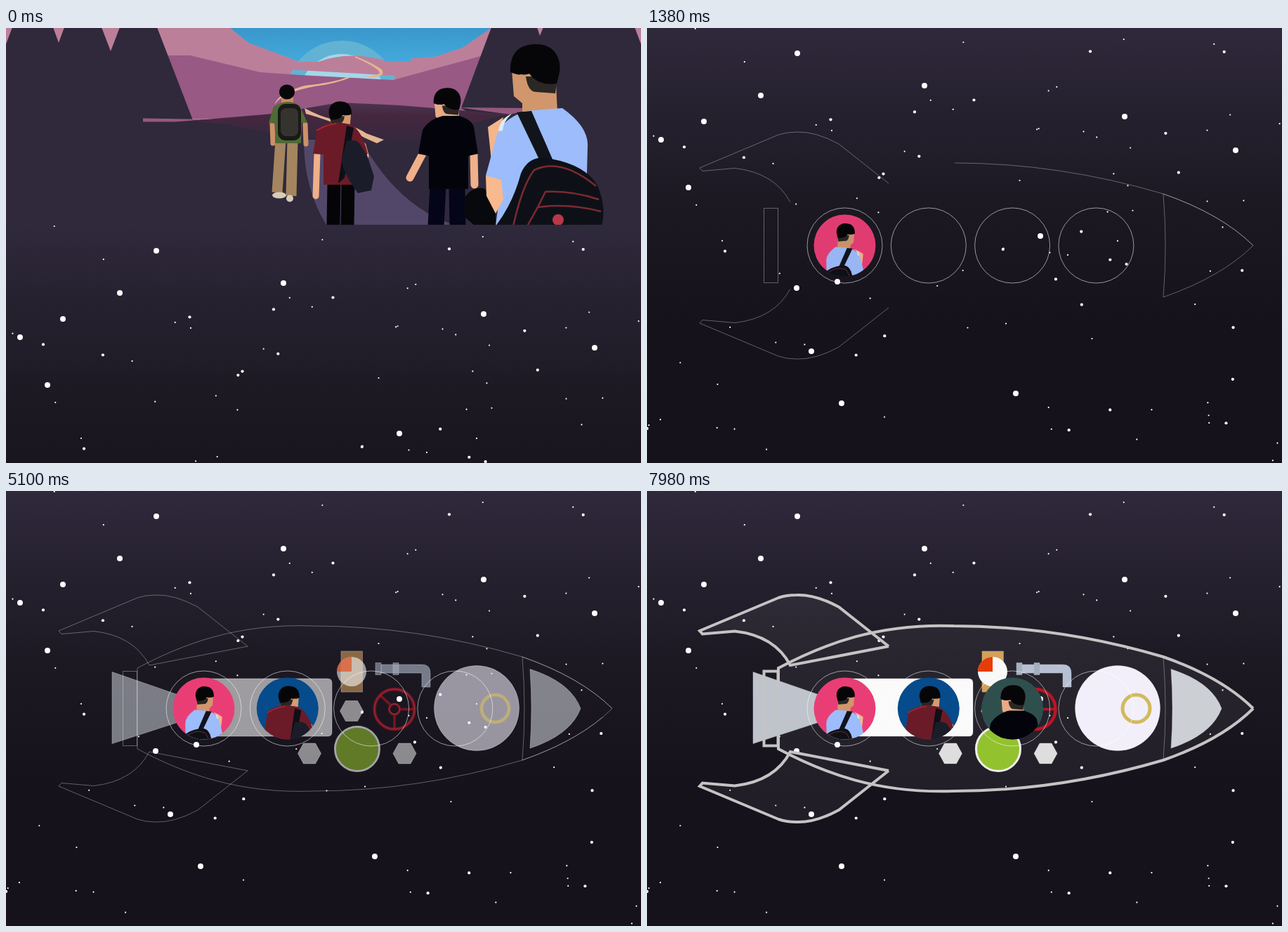
An HTML page for the animation above (8000 ms loop, 904 by 619 pixels).

```html
<!DOCTYPE html>
<html lang="en">
<head>
<meta charset="utf-8">
<title>Rocket journey</title>
<style>
html, body { margin: 0; width: 100%; height: 100%; overflow: hidden; background: #15121b; }
svg { display: block; width: 904px; height: 619px; }
.thin { fill: none; stroke: #fff; stroke-opacity: .32; }
.ring { fill: none; stroke: #fff; stroke-opacity: .55; }
.thick { fill: none; stroke: #c4c4c4; stroke-width: 4; }
#machinery > * { opacity: var(--shown); }
</style>
</head>
<body>
<svg id="stage" viewBox="0 0 904 619"></svg>
<script>
const LOOP = 8000, SCROLL = 282, MIDDLE = 309.5;

// ---- drawing helpers ----
const path = (fill, d, more = '') => `<path fill="${fill}" d="${d}" ${more}/>`;
const disc = (fill, x, y, r, ry = r) => `<ellipse fill="${fill}" cx="${x}" cy="${y}" rx="${r}" ry="${ry}"/>`;
const box = (fill, x, y, w, h, r = 0) => `<rect fill="${fill}" x="${x}" y="${y}" width="${w}" height="${h}" rx="${r}"/>`;
const line = (color, width, d) => path('none', d, `stroke="${color}" stroke-width="${width}"`);
const limb = (color, width, d) => path('none', d, `stroke="${color}" stroke-width="${width}" stroke-linecap="round"`);
const place = (matrix, art) => `<g transform="matrix(${matrix})">${art}</g>`;
const mirror = art => place([1, 0, 0, -1, 0, 2 * MIDDLE], art);
const circle = (x, y, r) => `M${x + r} ${y}a${r} ${r} 0 1 1 ${-2 * r} 0a${r} ${r} 0 1 1 ${2 * r} 0z`;
const rect = (x, y, w, h) => `M${x} ${y}h${w}v${h}h${-w}z`;
const hex = (x, y) => `M${x - 16.5} ${y}l8 -14.5h17l8 14.5l-8 14.5h-17z`;
const gradient = (id, stops) => `<linearGradient id="${id}" x2="0" y2="1">${stops.map(([o, c]) =>
  `<stop offset="${o}" stop-color="${c}"/>`).join('')}</linearGradient>`;

// a head seen half from behind; dir 1 looks left, -1 right
const head = (x, y, size, dir, skin) => place([size * dir, 0, 0, size, x, y],
  path(skin, 'M-33 0L-30 38L-18 48V60H32L30 20L0 0z') +
  path('#2a2724', 'M-13 10Q-10 32 2 32L29 34L32 10z') +
  path('#060608', 'M-35 4C-36 -28 -18 -36 2 -36C28 -36 40 -14 34 8L31 20Q5 24 -8 6Q-20 10 -35 4z') +
  path(skin, 'M-23 8q9 -4 9 8t-8 10z'));

// ---- walkers ----
const green =
  limb('#cf9068', 7, 'M379 137L380 165M426 138L427 166') +
  line('#a4855f', 15, 'M391 160L386 235M408 160L406 240') +
  disc('#d8cbb8', 389, 239, 10, 4.5) + disc('#d8cbb8', 404, 243.5, 5) +
  box('#c98b63', 392, 95, 17, 15, 4) + disc('#08080a', 400, 92, 11, 10.5) +
  path('#4e6b35', 'M374 136L381 113Q400 100 418 111L429 136H421L420 165H383V137z') +
  box('#1a1917', 387, 109, 33, 52, 11) + box('#35332d', 391, 115, 25, 40, 8);

const red =
  limb('#f0b088', 9, 'M443 180L441 240M508 168L512 183') +
  line('#050507', 19, 'M467 222L466 283M487 222L486 283') +
  head(476, 122, .46, -1, '#d99a70') +
  path('#6b1b27', 'M437 180L443 145Q450 138 472 135L490 138Q507 146 515 180L500 190L497 224H452V181z') +
  line('#b02a35', 1.5, 'M442 147Q455 139 470 137') +
  path('#0e0f16', 'M485 140L495 143L482 214L473 222z') +
  path('#1a1d29', 'M485 162Q500 158 505 168L514 182L524 212L520 232L501 236Q478 205 478 188z');

const black =
  limb('#f0b088', 11, 'M593 180L575 214M666 180L667 224') +
  line('#050519', 23, 'M615 226L612 283M642 226L643 283') +
  head(628, 106, .55, 1, '#e8ab84') +
  path('#03040b', 'M587 180L593 146Q602 131 622 126H645Q664 132 666 142L672 180L658 183V230H602V183z') +
  path('#08090c', 'M653 242Q665 225 682 230L697 265V283H668L653 270z');

const blue =
  path('#f5b58b', 'M686 142L708 128L702 160L691 190z') +
  head(753, 60, 1, 1, '#d1966c') +
  path('#9dbcfb', 'M683 211L697 160Q702 132 740 119L792 115Q830 142 828 170L825 283H697L705 220z') +
  path('#f8b98f', 'M683 211L705 217L708 245L697 265L684 240z') +
  path('#d8ecfb', 'M701 148Q703 130 720 123Q708 134 707 147z') +
  path('#11141b', 'M727 121L748 119L779 190H760z') +
  path('#0d1117', 'M697 283Q722 250 733 208Q745 180 775 187Q825 196 842 225Q855 255 848 283z') +
  line('#7d2933', 2.5, 'M722 283Q735 225 752 203Q790 185 840 226M742 283L757 256Q800 250 847 262M757 256L768 234Q805 232 844 245') +
  disc('#b8384a', 786, 274, 8);

// ---- valley ----
const ground = '#2f293b', river = '#e3b592';
const valley = [
  box('#bc7f9a', 0, 0, 904, 140),
  path('url(#sky)', 'M318 0L345 22L418 49H575L578 44L610 42L650 29L692 0z'),
  disc('#62b3d3', 478, 99, 80), disc('#a2d8ea', 478, 99, 61),
  path('#bc7f9a', 'M400 60L418 49H445Q490 32 545 49L575 50V70z'),
  path('#985984', 'M228 40H262L362 64L420 68L551 75L676 41V130H250z'),
  path(river, 'M497 41Q520 50 535 60Q541 70 524 71H507Q528 69 532 65Q530 57 497 43z'),
  path(river, 'M492 71Q470 80 440 84Q395 92 382 110Q387 94 425 83Q470 78 485 71z'),
  path(ground, 'M0 24L9 0H67L75 22L83 0H136L149 34L162 0H215L266 132H0z'),
  path(ground, 'M691 0H756L760 12L765 0H895L904 24V140H690L648 115z'),
  box(ground, 0, 131, 904, 152),
  path('#96587f', 'M195 129.5L290 131L240 134.5H195zM645 114L740 115V119L717 124z'),
  path('url(#hill)', 'M262 133L380 123L475 107L560 111L717 124Q640 140 600 160L520 164Q400 158 315 138z'),
  path('#534769', 'M424 160H505Q560 260 645 283H457Q424 230 424 160z'),
  path(river, 'M425 115Q445 126 465 131Q500 142 513 151L538 160L528 165L510 157Q480 138 427 123z'),
  green, red, black, blue
].join('');

// ---- stars: the large ones are placed, the rest are scattered ----
let seed = 7;
const random = () => (seed = seed * 16807 % 2147483647) / 2147483647;
const scatter = (n, r) => Array.from({ length: n }, () => disc('#fff', random() * 904, random() * 619, r)).join('');
const bright = '214,36 162,96 81,133 20,159 395,82 59,227 680,126 838,174 560,296 271,361 213,370 234,460 277,534 525,520';
const stars = bright.split(' ').map(p => disc('#fff', ...p.split(','), 4)).join('') + scatter(28, 2.1) + scatter(70, 1.1);

// ---- rocket ----
const fin = 'M344 221L273 165Q240 147 213 148Q198 148 187 152L75 199L79 203.5L125 199.5Q182 206 204 248z';
const body = 'M863 309.5Q818 265 735 236Q586 192 437 192C330 188 253 217 187 252V367C253 402 330 431 437 427Q586 427 735 383Q818 354 863 309.5';
const half = 'M187 309.5V252C253 217 330 188 437 192Q586 192 735 236Q818 265 863 309.5';
const nose = 'M735 236Q818 265 863 309.5Q818 354 735 383Q741 309.5 735 236';
const tail = rect(166.5, 256.5, 20, 106);
const cone = 'M151 257.5L245 290V329L151 359.5z';
const cabin = 'M285 267H458q6 0 6 6V343q0 6 -6 6H285z';
const pipe = 'M534 247H592Q604 247 604 259V279H592V259H534z';
const tip = 'M746 253.5Q804 272 818 309.5Q804 347 746 366Q750 309.5 746 253.5z';
const hexes = [hex(492, 313), hex(432, 373.5), hex(567.5, 373.5)];
const flanges = [rect(526, 244.5, 8, 17), rect(551, 244.5, 8, 17)];
const gauge = circle(500, 367, 31.5), wheel = circle(553, 310.5, 28.5), hub = circle(553, 310.5, 7.5);
const tank = circle(670, 309, 60.5), valve = circle(696.5, 309.5, 19.5), post = rect(477, 228, 30.5, 58);
const windowX = i => 281.5 + 119.3 * i;

const strokes = (cls, list) => list.map(d => `<path class="${cls}" d="${d}"/>`).join('');
const outline = strokes('thin', [body, nose, tail, fin]) + mirror(strokes('thin', [fin])) +
  strokes('ring', [0, 1, 2, 3].map(i => circle(windowX(i), MIDDLE, 53.5)));
const partsA = strokes('thin', [cone, cabin, hexes[1]]);
const partsB = strokes('thin', [post, pipe, tip, hexes[0], hexes[2], ...flanges, gauge, wheel, hub, tank, valve]);
const hull = strokes('thick', [half, fin]);

const machinery = [
  path('#bec3cc', cone), path('#fafafa', cabin), path('#d4a05a', post),
  disc('#f8f8f8', 492, 257, 21), path('#e63c08', 'M492 257H471A21 21 0 0 1 492 236z'),
  path('#dedede', hexes.join('')),
  path('#93c22f', gauge, 'stroke="#f0f0f0" stroke-width="3"'),
  line('#bb1424', 4.5, wheel), line('#bb1424', 3.5, hub + 'M560 310.5H580M553 318V338M548 305L533 291'),
  path('#b7c0d3', pipe), path('#a3aec0', flanges.join('')),
  path('#f2effb', tank), line('#d2ba5c', 5, valve), path('#ccd0d4', tip)
].join('');

// the riders are the walkers again, resized into the windows
const riders = [
  ['#e93e75', place([-.37, 0, 0, .37, 561.6, 269], blue)],
  ['#064b8b', place([.92, 0, 0, .92, -35, 180.4], red)],
  ['#2f4f4f', place([.91, 0, 0, .91, -50.5, 197.8], black)]
];
const portraits = riders.map(([tint, art], i) =>
  `<clipPath id="w${i}"><circle cx="${windowX(i)}" cy="${MIDDLE}" r="44"/></clipPath>
   <g id="rider${i}" clip-path="url(#w${i})">${disc(tint, windowX(i), MIDDLE, 45)}${art}</g>`).join('');

document.getElementById('stage').innerHTML = `<defs>
  ${gradient('sky', [[0, '#3a97cb'], [1, '#43a9da']])}
  ${gradient('hill', [[0, '#4b3450'], [.35, '#44273f'], [1, '#34293e']])}
  ${gradient('night', [[0, '#2f293c'], [.18, '#26212f'], [.42, '#1b1822'], [.7, '#15121b']])}
  </defs>
  <g id="valley">${valley}</g>
  <g id="space">${box('url(#night)', 0, -1, 904, 621)}${stars}
    <g id="glass">${path('#fff', body)}${path('#fff', fin)}${mirror(path('#fff', fin))}</g>
    <g id="partsA">${partsA}</g><g id="partsB">${partsB}</g>
    <g id="machinery">${machinery}</g>
    <g id="outline">${outline}</g>
    ${portraits}
    <g id="hull">${hull}${mirror(hull)}${strokes('thick', [tail])}</g>
  </g>`;

// ---- motion ----
const $ = id => document.getElementById(id);
const clamp = x => Math.min(1, Math.max(0, x));

// the CSS "ease" curve, cubic-bezier(.25, .1, .25, 1)
function ease(x) {
  x = clamp(x);
  let lo = 0, hi = 1;
  for (let i = 0; i < 24; i++) {
    const s = (lo + hi) / 2;
    if (.75 * s * (1 - s) + s ** 3 < x) lo = s; else hi = s;
  }
  return .3 * (1 - lo) ** 2 * lo + 3 * (1 - lo) * lo * lo + lo ** 3;
}

// show the first `len` pixels of every line in a group
function draw(id, len) {
  const g = $(id);
  g.style.display = len > 0 ? '' : 'none';
  g.setAttribute('stroke-dasharray', len + ' 4000');
}
const fade = (id, a) => $(id).setAttribute('opacity', a);
const shift = (id, y) => $(id).setAttribute('transform', `translate(0 ${y})`);

function render(t) {
  const left = Math.min(SCROLL, 619 * (1 - ease(.316 + t / 980)));
  shift('valley', left - SCROLL);
  shift('space', left);

  draw('outline', 1520 * ease((t - 780) / 3000));
  draw('partsA', 540 * ease((t - 1690) / 900));
  draw('partsB', 400 * ease((t - 2530) / 900));
  $('machinery').style.setProperty('--shown', ease((t - 4080) / 3000));
  riders.forEach((_, i) => fade('rider' + i, ease((t - 1070 - 3000 * i) / 400)));

  const h = 1 - (1 - clamp((t - 6610) / 1360)) ** 1.6;
  draw('hull', 775 * h);
  fade('glass', .05 * h);
}

const start = performance.now();
function tick() {
  render((performance.now() - start) % LOOP);
  requestAnimationFrame(tick);
}
tick();
</script>
</body>
</html>
```
